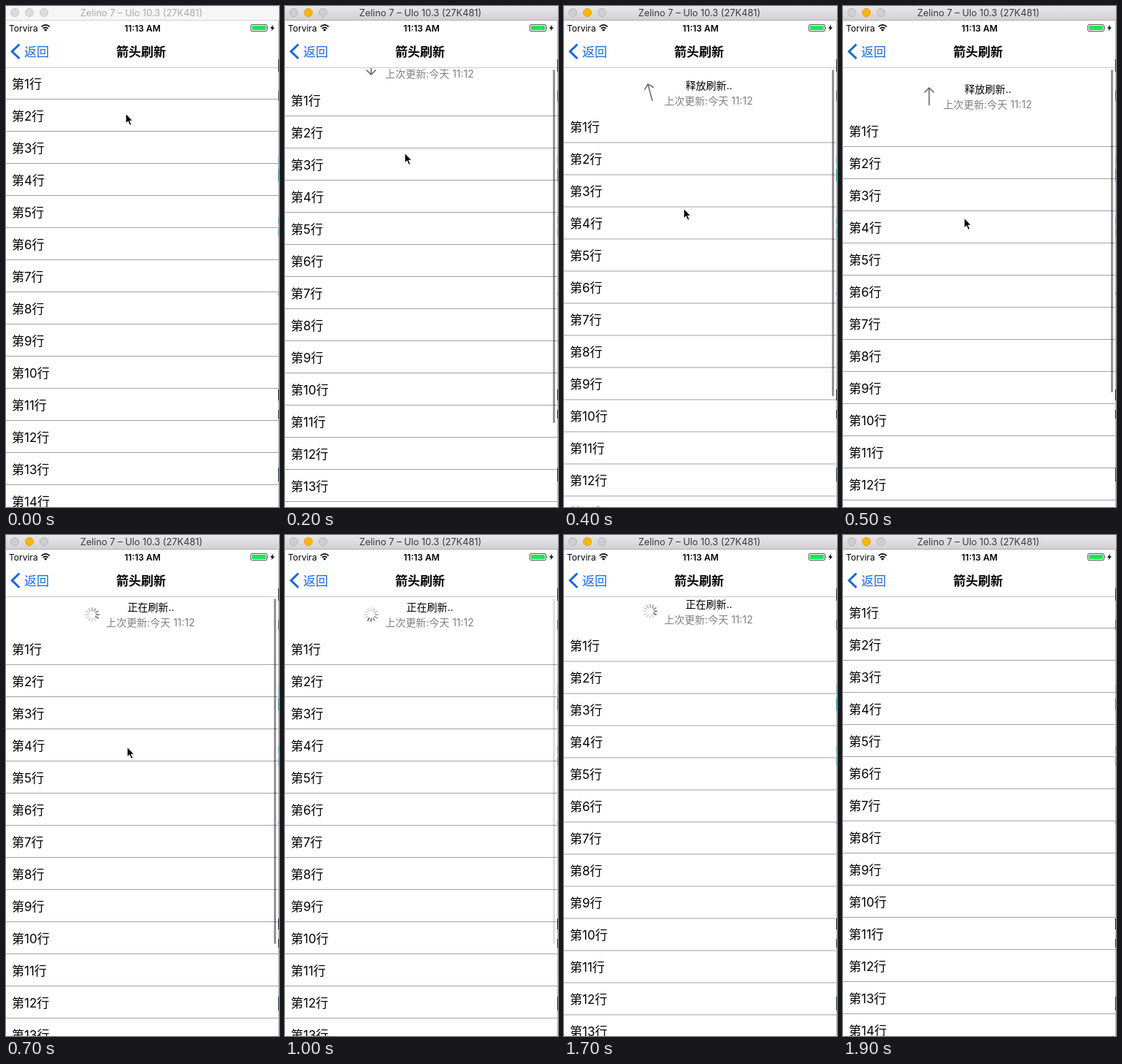
An HTML page that plays this animation: 374 by 686 pixels, repeating every 2000 ms.

```html
<!DOCTYPE html>
<html lang="zh-CN">
<head>
<meta charset="utf-8">
<title>箭头刷新</title>
<style>
html, body { margin: 0; width: 100%; height: 100%; overflow: hidden; background: #fff; }
svg { display: block; width: 374px; height: 686px; }
text { font-family: Inter, "Noto Sans CJK SC", "Noto Sans CJK", sans-serif; font-size: 17px; white-space: pre; }
.mid { text-anchor: middle; }
.small { font-size: 14px; }
.status { font-size: 12px; }
.bold { font-weight: 600; }
</style>
</head>
<body>
<svg viewBox="0 0 374 686">
  <defs>
    <linearGradient id="chrome" x2="0" y2="1">
      <stop stop-color="#e9e7e9"/>
      <stop offset="1" stop-color="#d2d0d2"/>
    </linearGradient>
  </defs>
  <rect width="374" height="686" fill="#fff"/>

  <g id="list">
    <g id="header">
      <text id="state" class="mid small" x="198.5" y="54"></text>
      <text class="mid small" x="198" y="75" fill="#808080">上次更新:今天 11:12</text>
      <g transform="translate(118 59)">
        <path id="arrow" d="M0-12V11.5M-6.5 5.5L0 12L6.5 5.5" fill="none" stroke="#626262" stroke-width="1.5"/>
        <g id="spinner"></g>
      </g>
    </g>
    <g id="rows"></g>
  </g>
  <rect id="bar" x="367" y="87" width="3" rx="1.5" fill="#000" fill-opacity=".42"/>

  <g id="nav">
    <rect y="19" width="374" height="65" fill="#fff"/>
    <rect y="84" width="374" height="1" fill="#c9c9c9"/>
    <path d="M18.3 52.5L8.3 62.3L18.3 72" fill="none" stroke="#1766dc" stroke-width="3"/>
    <text x="25" y="68.5" fill="#1766dc">返回</text>
    <text class="mid bold" x="185" y="68.5">箭头刷新</text>
    <text class="status" x="4" y="34.5">Torvira</text>
    <g fill="none" stroke="#000" stroke-width="1.7">
      <path d="M48.6 28.4Q54.2 23.4 59.8 28.4M50.7 30.8Q54.2 27.8 57.7 30.8"/>
    </g>
    <path d="M52 32.4Q54.2 30.6 56.4 32.4L54.2 34.8Z"/>
    <text class="mid status bold" x="187" y="34.5">11:13 AM</text>
    <rect x="335.5" y="25.5" width="22" height="9" rx="1.5" fill="#fff" stroke="#555"/>
    <rect x="337" y="27" width="19" height="6" fill="#23df5c"/>
    <path d="M358.5 28.3Q360.3 30 358.5 31.8Z" fill="#555"/>
    <path d="M366.2 25.5L362 30.8H364.6L363.4 34.6L368 29.2H365.2Z"/>
  </g>

  <rect id="chromeBar" width="374" height="19"/>
  <rect id="chromeLine" y="19" width="374" height="1"/>
  <g id="lights" stroke-width="1"></g>
  <text id="windowTitle" class="mid" x="185.5" y="14" style="font-size:12.8px">Zelino 7 – Ulo 10.3 (27K481)</text>
  <g id="edge"></g>
  <path id="cursor" d="M0 0V14.2L3.2 11.2L5.5 16.4L8 15.3L5.7 10.3H10Z" fill="#000" stroke="#fff" stroke-width="1.1"/>
</svg>
<script>
const STEP = 100, STEPS = 20;
const $ = id => document.getElementById(id);
const set = (node, attrs) => {
  for (const key in attrs) node.setAttribute(key, attrs[key]);
  return node;
};
const add = (parent, tag, attrs, text = '') => {
  const node = set(document.createElementNS(parent.namespaceURI, tag), attrs);
  node.textContent = text;
  return parent.appendChild(node);
};
const show = (node, on) => { node.style.display = on ? '' : 'none'; };

for (let i = 0; i < 14; i++) {
  add($('rows'), 'text', { x: 8, y: 112.5 + 44 * i }, `第${i + 1}行`);
  add($('rows'), 'rect', { y: 127 + 44 * i, width: 374, height: 1, fill: '#a2a2a2' });
}

const lights = [12, 32, 52].map(cx => add($('lights'), 'circle', { cx, cy: 9, r: 5.5 }));

const spokes = Array.from({ length: 12 }, (_, i) => add($('spinner'), 'line', {
  y1: -5.5, y2: -9.2, transform: `rotate(${30 * i})`, 'stroke-width': 1.9, 'stroke-linecap': 'round'
}));

// Slivers of the desktop beside the window
add($('edge'), 'rect', { x: 373, y: 20, width: 1, height: 666, fill: '#b5b5b5' });
[[73, 17, '#222'], [116, 14, '#555'], [205, 13, '#6aa5a8'], [223, 17, '#168a93'],
 [289, 10, '#4f9ea3'], [304, 12, '#4f9ea3'], [392, 4, '#4f9ea3'],
 [525, 15, '#111'], [553, 12, '#222'], [632, 19, '#123038']]
  .forEach(([y, height, fill]) => add($('edge'), 'rect', { x: 373, y, width: 1, height, fill }));

// Finger travel while pulling, then list offset after release
const drag = [0, 25, 54, 95, 130, 143];
const settle = { 6: 54, 17: 45.5, 18: 0, 19: 0 };
const turn = { 4: 165, 5: 180 };
const barFade = { 9: .7, 10: .3 };

function rubberBand(travel) {
  const eased = Math.max(0, travel - 10.5) * .55;
  return Math.round(2 * eased / (1 + eased / 602)) / 2;
}

function draw(step) {
  const pulling = step < drag.length;
  const offset = pulling ? rubberBand(drag[step]) : settle[step] ?? 50;
  const active = step > 0;

  set($('list'), { transform: `translate(0 ${offset})` });
  $('state').textContent = !pulling ? '正在刷新..' : offset > 50 ? '释放刷新..' : '下拉刷新..';
  show($('header'), offset > 0);
  show($('arrow'), pulling);
  show($('spinner'), !pulling);
  set($('arrow'), { transform: `rotate(${turn[step] ?? 0})` });

  const head = Math.round((step - 14) * 1.2) + 24;
  spokes.forEach((spoke, i) => {
    const age = (head - i + 24) % 12;
    const tone = Math.min(218, 118 + age * 15);
    set(spoke, { stroke: `rgb(${tone},${tone},${tone})` });
  });

  set($('bar'), {
    height: pulling ? 507 - offset : 473,
    opacity: step < 1 || step > 10 ? 0 : barFade[step] ?? 1
  });

  set($('chromeBar'), { fill: active ? 'url(#chrome)' : '#f6f6f6' });
  set($('chromeLine'), { fill: active ? '#b1afb1' : '#d2d2d2' });
  set($('windowTitle'), { fill: active ? '#3b3b3b' : '#aaa' });
  lights.forEach((light, i) => {
    const lit = active && i === 1;
    set(light, {
      fill: lit ? '#fdb50f' : active ? '#d0ced0' : '#dcdcdc',
      stroke: lit ? '#e3a01c' : active ? '#b8b6b8' : '#c8c8c8'
    });
  });

  show($('cursor'), step < 9);
  const travel = drag[Math.min(step, drag.length - 1)];
  set($('cursor'), { transform: `translate(${step < 5 ? 164 : 166} ${147 + travel})` });
}

let shown = -1;
const start = performance.now();
function tick() {
  const step = Math.floor((performance.now() - start) / STEP) % STEPS;
  if (step !== shown) draw(shown = step);
  requestAnimationFrame(tick);
}
tick();
</script>
</body>
</html>
```
